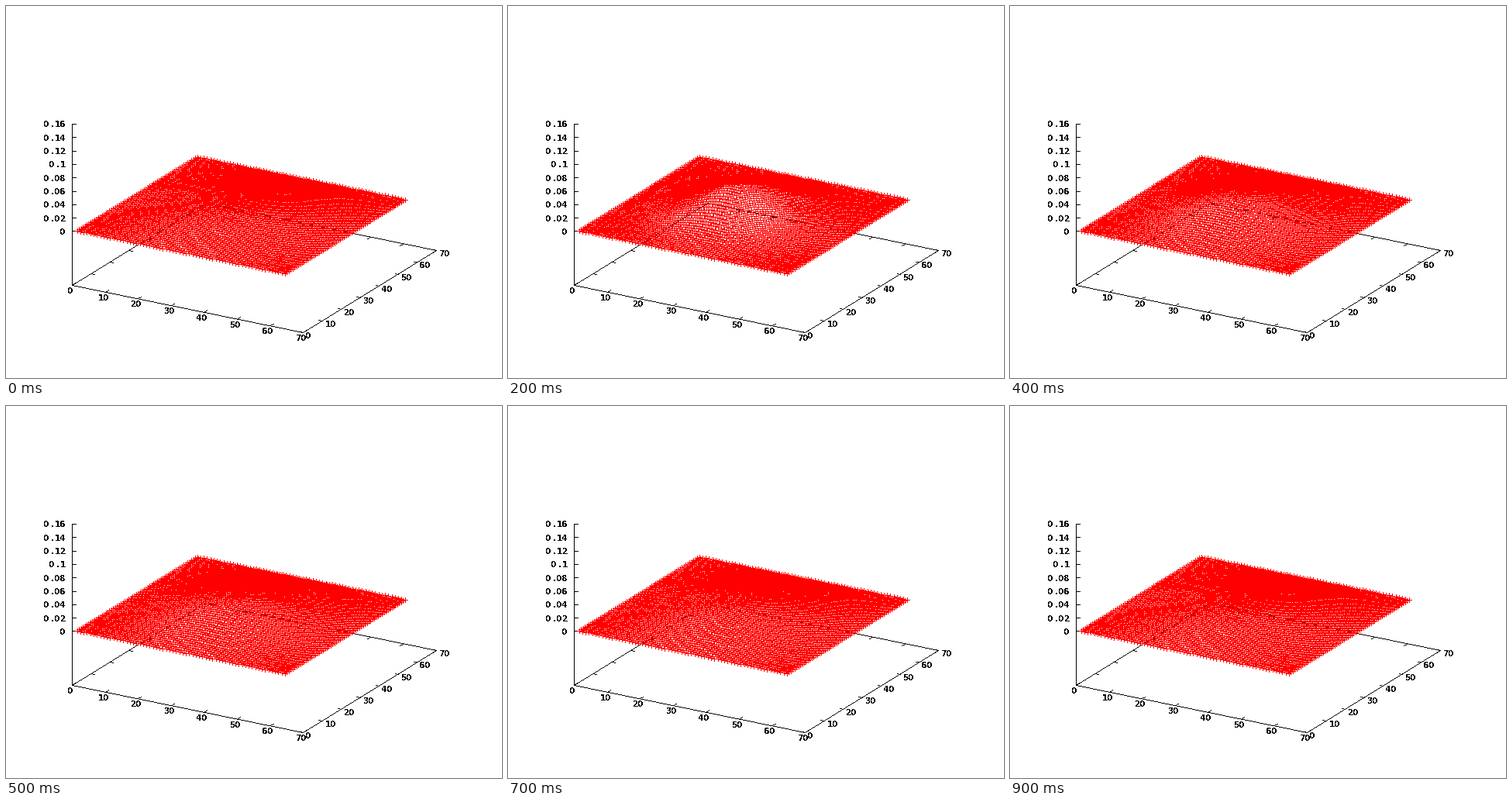
A matplotlib script that plays this animation: 640x480 px, repeating every 1000 ms.

```python
import numpy as np
import matplotlib.pyplot as plt
from matplotlib.animation import FuncAnimation

W, H, DPI = 640, 480, 100
FRAMES, INTERVAL = 10, 100
PIXEL = 72 / DPI                       # one pixel in points
RED, BLACK = (255, 0, 0), (0, 0, 0)

# Screen vectors, in pixels, of the oblique projection
ORIGIN = np.array([85.0, 360.0])
X_STEP = np.array([298.0, 61.0]) / 70
Y_STEP = np.array([172.0, -105.7]) / 70
Z_ZERO, Z_TOP, Z_MAX = 290.5, 152.0, 0.16
Z_SCALE = (Z_ZERO - Z_TOP) / Z_MAX

N = 64                                 # grid points per side
ARM = 3                                # arm length of a plus mark
MASS = 40.9
MODES = np.arange(1, 16, 2)

fig = plt.figure(figsize=(W / DPI, H / DPI), dpi=DPI, facecolor="white")
ax = fig.add_axes([0, 0, 1, 1])
ax.set_xlim(0, W)
ax.set_ylim(H, 0)
ax.axis("off")
backdrop = np.full((H, W, 3), 255, np.uint8)


def floor_point(x, y):
    return ORIGIN + x * X_STEP + y * Y_STEP


def line(a, b):
    """One pixel wide line without smoothing."""
    a, b = np.round(a), np.round(b)
    count = int(np.abs(b - a).max()) + 1
    x, y = np.round(np.linspace(a, b, count)).astype(int).T
    backdrop[y, x] = BLACK


def label(text, left, middle, cell=7):
    """Write text in monospaced cells, centred vertically on middle."""
    for i, char in enumerate(text):
        ax.text(round(left) + cell * (i + 0.5), round(middle) + 4, char,
                ha="center", va="baseline", family="DejaVu Sans",
                weight="bold", size=10.5 * PIXEL, antialiased=False, zorder=2)


def draw_axes():
    corners = [floor_point(*c) for c in ((0, 0), (70, 0), (70, 70), (0, 70))]
    for a, b in zip(corners, corners[1:] + corners[:1]):
        line(a, b)
    line(ORIGIN, (ORIGIN[0], Z_TOP))

    x_tick, y_tick = X_STEP, Y_STEP * 1.7
    for v in range(0, 71, 10):
        text = str(v)
        front, rear = floor_point(v, 0), floor_point(v, 70)
        right, left = floor_point(70, v), floor_point(0, v)
        line(front, front + y_tick)
        line(rear, rear - y_tick)
        line(right, right - x_tick)
        line(left, left + x_tick)
        label(text, front[0] - 2 - 3.5 * len(text), front[1] + 7)
        label(text, right[0] + 4, right[1] + 4)

    for i in range(9):
        value = i * 0.02
        y = Z_ZERO - value * Z_SCALE
        line((ORIGIN[0], y), (ORIGIN[0] + 5, y))
        text = f"{value:.2g}"
        label(text, 77 - 7 * len(text), y + 0.4)


def profile(variance):
    """Point source spread along one axis, held at zero at both ends."""
    length = N - 1
    s = np.arange(N) / length
    k = MODES * np.pi
    weight = np.sin(k / 2) * np.exp(-k**2 * variance / (2 * length**2))
    return 2 / length * weight @ np.sin(np.outer(k, s))


def scene(step):
    g = profile(59 + 35 * step)
    x, y = np.meshgrid(np.arange(1, N + 1), np.arange(1, N + 1))
    z = MASS * np.outer(g, g)
    px = ORIGIN[0] + x * X_STEP[0] + y * Y_STEP[0]
    py = Z_ZERO + x * X_STEP[1] + y * Y_STEP[1] - z * Z_SCALE
    px, py = np.round(px).astype(int), np.round(py).astype(int)

    image = backdrop.copy()
    for d in range(-ARM, ARM + 1):
        image[py + d, px] = RED
        image[py, px + d] = RED
    return image


draw_axes()
picture = ax.imshow(backdrop, extent=(0, W, H, 0), aspect="auto",
                    interpolation="nearest", zorder=1)


def update(frame):
    # The loop opens on the most diffused state
    picture.set_data(scene(frame or FRAMES - 1))
    return [picture]


animation = FuncAnimation(fig, update, frames=FRAMES, interval=INTERVAL,
                          repeat=True, repeat_delay=0, blit=False)
plt.show()
```
